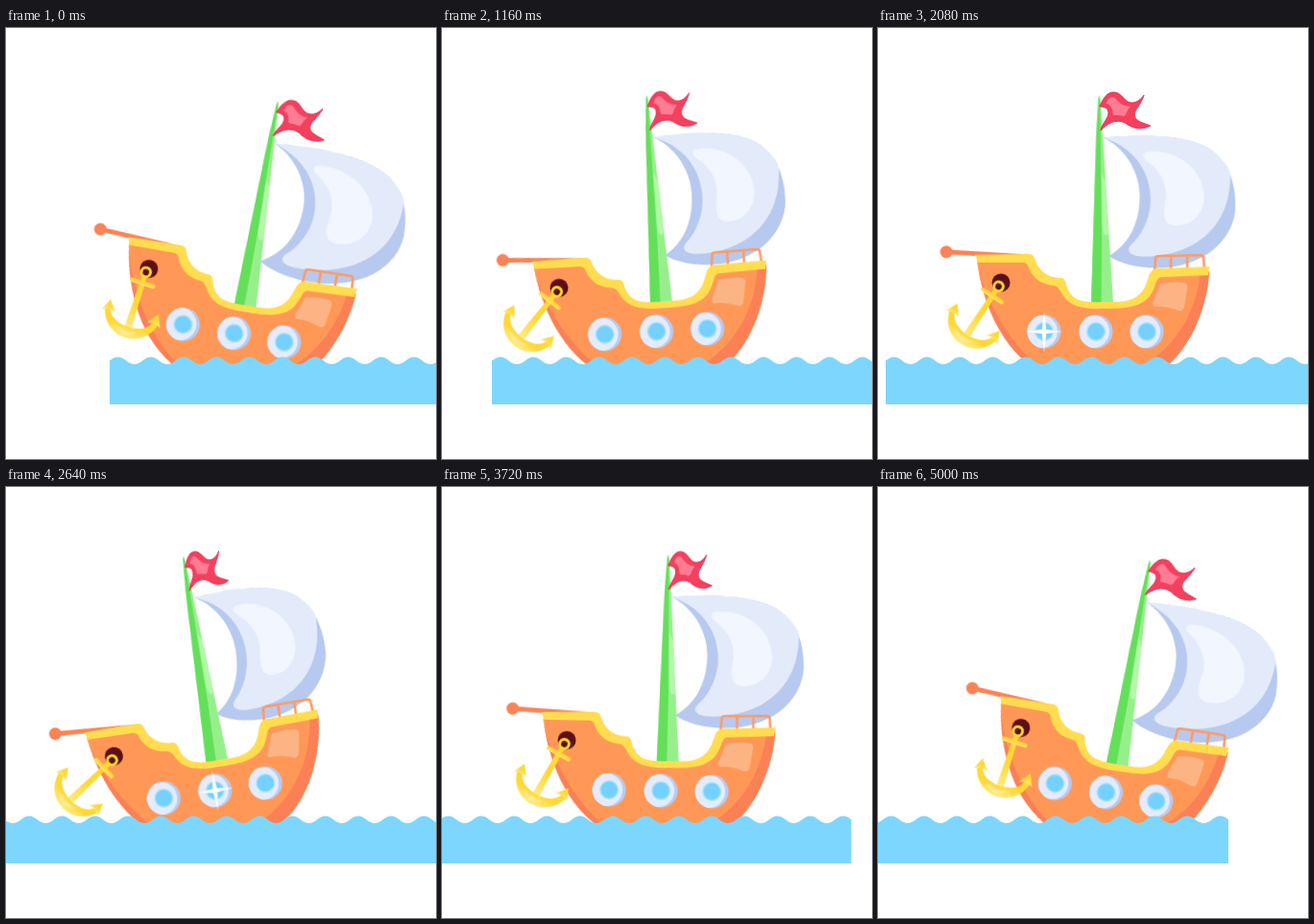
Recreate the animation shown at these times as an HTML page without scripts. Size 448 px wide and 450 px high, loop 5040 ms.

```html
<!DOCTYPE html>
<html lang="en">
<head>
<meta charset="utf-8">
<title>Sailing ship</title>
<style>
  html, body { margin: 0; width: 100%; height: 100%; overflow: hidden; background: #fff; }
  svg { display: block; width: 448px; height: 450px; }

  /* The motion lasts 5000 ms (99.206%) and then rests for 40 ms. */
  .boat, .sail, .anchor, .flag {
    animation: 5040ms cubic-bezier(.333, 0, .667, 1) infinite;
  }
  .boat { animation-name: rock; transform-origin: 222px 379px; }
  .sail { animation-name: billow; transform-origin: 235px 180px; }
  .anchor { animation-name: swing; }
  .flag { animation-name: flutter; }
  .water { animation: drift 5040ms linear infinite; }
  .star { animation: twinkle 5040ms ease-out infinite both; }
  .second { animation-delay: 750ms; }
  .third { animation-delay: 1400ms; }

  @keyframes rock {
    0%, 33.07%, 66.14%, 99.206%, 100% { transform: rotate(9.95deg); }
    16.53%, 49.6%, 82.67% { transform: rotate(-9.95deg); }
  }
  @keyframes billow {
    0%, 33.07%, 66.14%, 99.206%, 100% { transform: scaleX(1.078); }
    16.53%, 49.6%, 82.67% { transform: scaleX(.912); }
  }
  @keyframes swing {
    0%, 33.07%, 66.14%, 99.206%, 100% { transform: rotate(8deg); }
    16.53%, 49.6%, 83.9% { transform: rotate(58.5deg); }
  }
  @keyframes flutter {
    0%, 19.84%, 39.68%, 59.52%, 79.37%, 99.206%, 100% { transform: none; }
    9.92%, 29.76%, 49.6%, 69.44%, 89.29% { transform: scaleX(.74); }
  }
  @keyframes drift {
    0% { transform: translateX(108px); }
    99.206%, 100% { transform: translateX(-132px); }
  }
  @keyframes twinkle {
    0%, 26.6% { transform: scale(0); }
    38.2%, 41.4% { transform: scale(1); }
    44.6%, 100% { transform: scale(0); }
  }
</style>
</head>
<body>
<svg viewBox="0 0 448 450">
  <defs>
    <linearGradient id="gold" x1="0" y1="0" x2="0" y2="1">
      <stop offset=".5" stop-color="#ffd836"/>
      <stop offset="1" stop-color="#ffec88"/>
    </linearGradient>
    <clipPath id="ring"><circle r="17.5"/></clipPath>
    <clipPath id="hullShape"><use href="#hull"/></clipPath>
    <path id="hull" d="M103 242L155 241C160 258 170 265 190 265C195 285 215 291 240 290C275 290 280 275 287 255L345 254C343 295 322 342 291 360C270 370 185 370 168 359C128 335 108 285 103 242Z"/>
    <path id="spark" fill="#fff" d="M0-21L2.200-2.200L19 0L2.200 2.200L0 21L-2.200 2.200L-19 0L-2.200-2.200Z"/>
    <g id="porthole">
      <circle r="17.5" fill="#b9caf0"/>
      <circle cx="-3" r="17" fill="#e4ecfc" clip-path="url(#ring)"/>
      <circle r="10" fill="#aadffb"/>
      <circle r="8.500" fill="#74d1fd"/>
    </g>
    <g id="fluke">
      <path d="M0 62C12 62 21 58 25 48L30 50C26 65 14 74 0 74Z"/>
      <path d="M27 39.5L33 52.5Q25 48 17.5 51.5Z"/>
    </g>
  </defs>

  <g class="boat">
    <g class="sail">
      <path fill="#b7c9ef" d="M234 114.500C270 111.500 325 109 350 129C368 144 373 166 373 187C371 221 340 250.500 290 250.500C270 250.500 250 245 240 238C260 227 273 205 272.500 174C272 147 254 123 234 114.500Z"/>
      <path fill="#e3ebfb" d="M234 114.500C270 111.500 325 109 350 129C360 138 365 144 367 150C370 202 335 238.500 275 238.500C263 238 258 233 263 227C274 217 284 200 284 178C283 145 262 123 234 114.500Z"/>
      <path fill="#f2f6fe" d="M278 130C300 124 338 140 340 175C340 195 325 208 308 206C295 204 298 190 300 175C300 155 289 146 279 138Q274 133 278 130Z"/>
    </g>

    <path fill="#97ef8b" d="M230 70L231.500 75L233.800 110L245 287Q233 290 222 287L227 110Z"/>
    <path fill="#b5f6aa" d="M232.500 152L237 160L240.500 214Q235 222 233.500 206Z"/>
    <path fill="#64df5a" d="M230 70L231 75L231.500 115L233 220L232.500 288L222 287L227 110L229 75Z"/>

    <g transform="translate(229.500 70)">
      <g class="flag">
        <path fill="#f4405f" stroke="#df3152" d="M1 12C5 3 9-3 16-3C25-3 27 8 35 8C41 8 45 4 48 0C45 10 38 15 38 21C39 28 48 29 55 32C45 37 36 35 28 29C18 24 9 30 2 37C4 28 12 24 10 16C9 13 5 12 1 12Z"/>
        <path fill="#ff7c92" d="M8 9C10 2 15 0 18 4C22 9 28 12 34 12C29 16 30 22 26 22C20 20 18 22 15 20C15 14 13 10 8 9Z"/>
      </g>
    </g>

    <path fill="#fb8356" d="M71 231.500L157 236.500V241L71 236.500Z"/>
    <circle cx="71" cy="234" r="6.500" fill="#fb8356"/>
    <path fill="none" stroke="#ff9a63" stroke-width="2.600" d="M288 253L289 241Q289 238 292 238L336 237Q339 237 339 240L340 252M305 238V252M322 238V252"/>

    <use href="#hull" fill="#ff9857"/>
    <g clip-path="url(#hullShape)" fill="#fb8056">
      <path d="M336 250C333 300 305 340 265 358V380H360V250Z"/>
      <path d="M103 242C108 280 140 338 180 362L150 380H100Z"/>
    </g>
    <path fill="#fdb485" d="M294 267Q307 264 319 266Q323 267 322 272L319 291Q318 296 313 295Q300 290 289 291Q285 290 287 285Z"/>
    <path fill="#ffdd4f" d="M101 237L157 236C162 236 163 240 165 246C170 256 180 261 190 261C197 261 194 268 200 277C206 285 215 287 235 286C255 286 265 286 274 276C283 266 280 250 292 251L345 249L344 258L296 260C288 260 291 270 282 281C272 292 255 293 235 293C212 294 200 290 193 280C188 272 188 270 183 269C172 268 163 263 158 253C156 247 155 245 150 245L104 245Z"/>

    <g transform="translate(173 317)"><use href="#porthole"/><use class="star" href="#spark"/></g>
    <g transform="translate(227 317)"><use href="#porthole"/><use class="star second" href="#spark"/></g>
    <g transform="translate(280 317)"><use href="#porthole"/><use class="star third" href="#spark"/></g>

    <circle cx="128" cy="266" r="9.500" fill="#5c1015"/>
    <g transform="translate(125.500 270) scale(.97)">
      <g class="anchor" fill="url(#gold)">
        <circle r="5" fill="none" stroke="#ffd836" stroke-width="3"/>
        <path d="M-2.500 5H2.500L4 66H-4Z"/>
        <rect x="-14.500" y="10" width="29" height="4.500" rx="2.200"/>
        <use href="#fluke"/>
        <use href="#fluke" transform="scale(-1 1)"/>
        <path fill="#ffeb8c" d="M-15 64Q0 68 10 65Q4 71-3 71Q-10 70-15 64Z"/>
      </g>
    </g>
  </g>

  <path class="water" fill="#7dd6fd" d="M0 393V347.300q8.570-7.600 17.140 0t17.140 0t17.140 0t17.140 0t17.140 0t17.140 0t17.140 0t17.140 0t17.140 0t17.140 0t17.140 0t17.140 0t17.140 0t17.140 0t17.140 0t17.140 0t17.140 0t17.140 0t17.140 0t17.140 0t17.140 0t17.140 0t17.140 0t17.140 0t17.140 0t17.140 0t17.140 0t17.140 0t17.140 0V393Z"/>
</svg>
</body>
</html>
```
